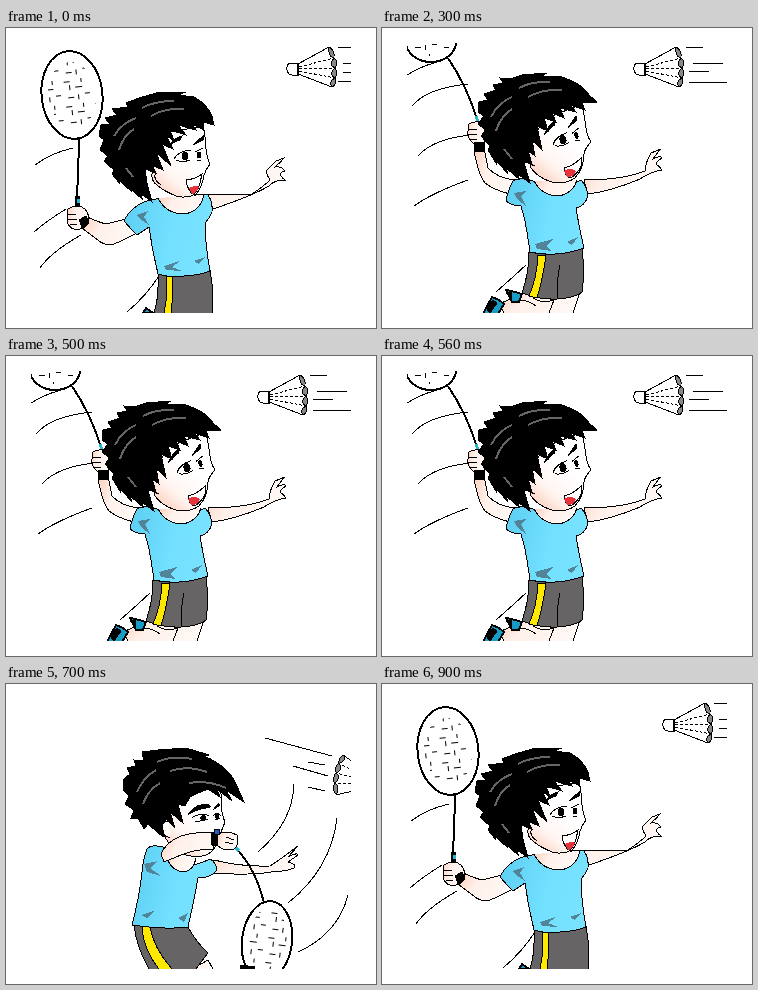
Animation, 370 px wide and 300 px high, one loop 1 s. Source, as an HTML page:

```html
<!DOCTYPE html>
<html lang="en">
<head>
<meta charset="utf-8">
<title>Badminton smash</title>
<style>
html, body { margin: 0; width: 100%; height: 100%; overflow: hidden; background: #fff }
svg { display: block; width: 370px; height: 300px }
path, ellipse { fill: none; stroke: #000; stroke-width: 1 }
.pose { display: none }
.pose.on { display: inline }
.skin { fill: url(#skin) }
.face { fill: url(#face) }
.shirt { fill: url(#shirt) }
.fold { fill: #528499; stroke: none }
.shorts { fill: #666465 }
.stripe { fill: #ffe800 }
.hair, .ink { fill: #000 }
.shine { stroke: #666; stroke-width: 2 }
.white { fill: #fff }
.feather { fill: #888 }
.red { fill: #e8323c; stroke: none }
.blue { fill: #2357c5 }
.shoe { fill: #189bc4; stroke-width: 2 }
.frame { fill: #fff; stroke-width: 2 }
.net { fill: url(#net); stroke: none }
.shaft { stroke-width: 2 }
.grip { stroke-width: 5 }
.tape { stroke: #24b9cc; stroke-width: 3 }
</style>
</head>
<body>
<svg viewBox="0 0 370 300" shape-rendering="crispEdges">
<defs>
  <clipPath id="view"><path d="M25 15H345V285H25Z"/></clipPath>
  <linearGradient id="skin" x2="1" y2=".3">
    <stop stop-color="#fbcdb8"/><stop offset=".4" stop-color="#fff0ea"/><stop offset="1" stop-color="#fff8f5"/>
  </linearGradient>
  <linearGradient id="face" x1=".1" y1="1" x2=".5" y2=".4">
    <stop stop-color="#fbc9b5"/><stop offset=".5" stop-color="#fff5f1"/><stop offset="1" stop-color="#fff"/>
  </linearGradient>
  <linearGradient id="shirt" x2="1" y2=".2">
    <stop stop-color="#5ccdf2"/><stop offset=".6" stop-color="#72e0ff"/><stop offset="1" stop-color="#78e2ff"/>
  </linearGradient>
  <pattern id="net" width="29" height="25" patternUnits="userSpaceOnUse">
    <path d="M1 3.500h6M6.500 7v5M12 9.500h7M18.500 1v4M21 16.500h5M4 19.500h6M14.500 17v5"/>
  </pattern>

  <g id="shuttle">
    <path class="white" d="M5 -5L36 -22Q42 -19 41 -11Q46 -7 42 -1Q46 4 42 9Q44 16 39 18L5 5Z"/>
    <path stroke-dasharray="3 2" d="M6 -2L41 -11M6 0L42 -1M6 2L42 9"/>
    <path class="feather" d="M36 -22Q42 -19 41 -11Q35 -12 36 -22M41 -11Q46 -7 42 -1Q35 -4 41 -11M42 -1Q46 4 42 9Q35 5 42 -1M42 9Q44 16 39 18Q35 13 42 9"/>
    <path class="white" d="M5 -6H-3Q-7 -4 -6 1Q-5 6 -1 6H5Z"/>
    <path stroke-width="2" d="M4 -6V6"/>
  </g>

  <g id="eyes">
    <path class="ink" d="M-16 -9Q-10 -18 -2 -20L-4 -16Q-9 -15 -16 -9ZM9 -11L19 -20L19 -16Z"/>
    <path stroke-width="2" d="M-10 3Q-6 -5 7 -6M11 -4L19 -8"/>
    <path d="M-8 4Q-2 7 6 4M13 4H17"/>
    <ellipse class="ink" cx="1" rx="3" ry="4"/><ellipse class="ink" cx="15" cy="-1" rx="1.500" ry="3"/>
    <path stroke="#fff" stroke-width="2" d="M0 -1h2"/>
  </g>
  <g id="squint">
    <path class="ink" d="M-12 -5Q-2 -15 10 -11L11 -8Q-1 -9 -12 -5ZM13 -5L20 -11L20 -8Z"/>
    <path stroke-width="2" d="M-9 -1Q0 -5 8 0M12 1Q17 -3 20 2"/>
    <path d="M-7 3Q0 5 7 3M13 5h5"/>
    <ellipse class="ink" cx="2" cy="1" rx="3" ry="2"/><ellipse class="ink" cx="16" cy="2" rx="2" ry="2"/>
  </g>
</defs>

<g clip-path="url(#view)">
<g class="pose" id="ready">
  <path d="M29 137Q45 125 67 120M28 204Q42 192 60 181M34 240Q45 224 75 207M121 284Q140 268 153 248"/>
  <use href="#shuttle" x="287" y="41"/>
  <path d="M332 19.5h13M337 35.5h8M337 44.5h8M332 53.5h13"/>
  <g transform="rotate(-6 66 67)">
    <ellipse class="frame" cx="66" cy="67" rx="30.500" ry="44"/>
    <ellipse class="net" cx="66" cy="67" rx="24" ry="33"/>
  </g>
  <path class="shaft" d="M73 111L72 150L70 180"/>
  <path class="grip" d="M71 168V178M68 196V201"/>
  <path class="tape" d="M72 171v4"/>
  <path class="skin" d="M79 188Q92 194 100 196L124 190L133 204Q116 213 108 216Q100 219 92 212L76 200Z"/>
  <path class="skin" d="M62 181Q60 190 62 196Q66 203 74 201L82 196Q84 186 79 181Q72 175 62 181ZM62 186h8M62 191h9M64 196h7"/>
  <path class="ink" d="M73 192L80 188L83 194L77 201Z"/>
  <path class="skin" d="M188 166H246Q258 158 264 152Q258 143 262 141L270 133L278 130Q275 134 269 139Q276 138 279 143Q270 145 279 152Q268 152 263 158Q246 168 207 181Z"/>
  <path class="shoe" d="M137 285L140 280L147 285Z"/>
  <path class="shorts" d="M152 246L204 242Q208 262 206 285H148Q153 270 152 246Z"/>
  <path class="stripe" d="M160 248H167Q167 270 165 285H158Q162 268 160 248Z"/>
  <path class="shirt" d="M150 171Q138 172 128 180Q121 186 118 193Q124 200 131 207Q137 203 143 199Q146 222 152 246Q165 250 178 248Q195 247 204 243Q199 215 199 195Q204 190 206 184Q207 174 202 167Q195 165 188 168Q170 174 155 170Z"/>
  <path class="fold" d="M130 187L142 183L138 189L143 197L134 191ZM158 238L174 233L166 239L176 243L160 242ZM188 233L199 229L193 236Z"/>
  <path class="skin" d="M152 170Q160 186 178 186Q194 184 198 167"/>
  <path class="face" d="M150 130L160 105L197 98Q200 112 200 121Q201 130 204 136Q200 141 198 147Q196 160 190 166Q180 171 170 168Q158 163 152 158Q143 152 147 142Z"/>
  <path class="white" d="M180 152Q190 151 196 146L194 155Q191 166 186 166Q181 160 180 152Z"/>
  <path class="red" d="M183 160Q189 157 193 159Q190 166 186 166Z"/>
  <path class="hair" d="M95 97L104 96L99 90L111 87L106 81L122 79L120 75L133 70L150 65L180 64L172 67L188 69Q200 75 206 88L208 97L197 94L198 102L186 96L190 102L172 97L180 107L164 102L168 113L160 107L167 121L156 116L165 138L150 124L157 142L146 137L150 145L139 141L141 155L146 174L134 165L137 172L124 160L126 164L113 152L114 156L106 146L108 142L98 133L102 128L94 122L98 112L93 108Z"/>
  <path class="shine" d="M108 108Q116 95 130 90M113 122Q117 108 128 101M136 80Q148 73 168 73M145 88Q158 80 178 81M120 140L127 149"/>
  <use href="#eyes" x="178" y="128"/>
  <path d="M150 145Q146 151 155 157"/>
</g>

<g class="pose" id="jump">
  <path d="M25 47Q40 38 52 35M30 78Q45 60 86 56M36 128Q52 110 90 107M32 178Q50 165 86 152M114 264Q130 250 144 237"/>
  <use href="#shuttle" x="258" y="41"/>
  <path d="M304 19.500h17M311 35.500h30M307 43.500h20M307 54.500h38"/>
  <ellipse class="frame" cx="49" cy="14" rx="25" ry="20"/>
  <ellipse class="net" cx="49" cy="14" rx="20" ry="14"/>
  <path class="shaft" d="M66 30Q85 58 96 94"/>
  <path class="tape" d="M94 88l2 6"/>
  <path class="skin" d="M92 122L102 120L106 140Q115 150 133 152L128 166Q112 162 103 155Q96 146 92 122Z"/>
  <path class="skin" d="M87 96Q94 92 101 95Q104 104 102 115L92 116Q85 111 86 103ZM87 101h8M86 106h9M88 111h7"/>
  <path class="ink" d="M92 115L102 114L102 123L93 123Z"/>
  <path class="skin" d="M202 152Q240 152 263 143Q264 133 269 125L279 121Q274 126 271 131Q278 127 280 130Q274 134 274 136Q277 138 280 142Q270 143 258 151Q230 163 206 166Z"/>
  <path class="skin" d="M117 276L140 266L198 264L191 285H122Z"/>
  <path d="M151 270Q160 276 172 272L167 285M132 272Q145 271 154 278"/>
  <path class="shoe" d="M102 284L110 269L117 272L122 276L116 286H101ZM124 262Q130 263 140 266L137 274H130Z"/>
  <path class="ink" d="M104 280L111 272L115 275L108 285ZM124 264L130 264L129 272Z"/>
  <path class="shorts" d="M147 224Q175 230 200 220Q203 245 200 264Q193 270 175 271Q158 272 140 265Q147 245 147 224Z"/>
  <path d="M178 237Q174 255 176 270"/>
  <path class="stripe" d="M156 227H164Q161 250 155 270L147 268Q155 250 156 227Z"/>
  <path class="shirt" d="M148 152Q136 149 131 153Q126 162 124 173Q130 178 139 178Q143 190 145 204L148 224Q175 230 202 220Q197 200 194 180Q203 178 206 168Q205 158 199 152Q185 160 165 157Z"/>
  <path class="fold" d="M132 165L144 163L139 168L144 178L135 171ZM153 216L171 211L164 218L170 223L155 221ZM185 214L196 209L190 217Z"/>
  <path class="skin" d="M152 153Q160 168 178 168Q192 164 195 152"/>
  <path class="face" d="M146 128L160 92L200 76Q203 92 204 100Q205 108 209 114Q203 120 202 126Q202 140 193 150Q183 157 170 154Q156 150 149 140Z"/>
  <path class="white" d="M182 140Q191 138 199 130L199 138Q195 147 188 150Q183 148 182 140Z"/>
  <path class="red" d="M182 143Q188 139 194 143Q191 150 185 149Z"/>
  <path class="hair" d="M97 74L106 72L102 66L114 62L111 57L121 55L118 50L128 51L140 47L165 45L160 48L180 49Q200 55 208 68L215 74L200 75L203 82L188 77L194 84L178 80L182 90L170 85L174 94L162 90L166 103L155 98L160 122L150 112L153 128L146 122L150 136L142 134L148 155L136 146L137 151L124 140L126 146L114 132L115 137L106 122L108 118L99 108L104 102L96 96L102 88L96 84Z"/>
  <path class="shine" d="M109 89Q116 75 130 69M114 103Q118 89 130 81M137 60Q150 53 168 54M146 69Q160 61 180 62M122 121L130 131"/>
  <use href="#eyes" transform="translate(180 112) rotate(-13)"/>
  <path d="M147 126Q143 135 153 138"/>
</g>

<g class="pose" id="hit">
  <path d="M69 23C110 8 185 20 224 46M243 15L252 21"/>
  <path class="skin" d="M209 169Q230 186 259 195Q270 191 287 191L275 196Q286 199 288 203L278 203Q282 207 277 210Q268 208 262 204Q235 201 203 182Z"/>
  <path class="skin" d="M180 274H191L184 285H174ZM144 280L158 280L156 285H143Z"/>
  <path class="skin" d="M114 276L138 269L138 279L118 285Z"/>
  <path class="shoe" d="M97 284L104 268L112 265L114 273L109 286H98ZM119 267L125 262L141 269L139 275H128Z"/>
  <path class="ink" d="M99 281L105 271L109 274L104 285ZM120 267L127 264L128 272Z"/>
  <path class="shorts" d="M138 233Q165 240 193 236Q196 255 194 272Q185 276 177 276Q160 281 137 280Q142 255 138 233Z"/>
  <path d="M172 244Q169 260 171 276"/>
  <path class="stripe" d="M148 235H156Q156 256 154 280H146Q149 258 148 235Z"/>
  <path class="shirt" d="M152 163Q140 157 132 160Q132 174 136 187Q140 190 144 187Q143 210 137 234Q165 239 195 235Q196 210 197 186Q201 186 203 182L210 169Q207 163 201 162Q188 170 165 166Z"/>
  <path class="fold" d="M142 180L153 175L146 182L152 191L143 187ZM147 209L158 205L152 211L150 219ZM180 227L192 221L184 230Z"/>
  <path class="skin" d="M155 165Q165 180 180 179Q187 176 188 165"/>
  <path class="face" d="M152 140L165 105L202 98Q204 112 204 122Q205 130 209 135Q204 140 203 146Q202 158 194 164Q185 168 172 165Q160 160 154 152Z"/>
  <path class="red" d="M186 152L198 152L194 159L187 157Z"/>
  <path d="M183 149Q193 152 201 147L196 157Q190 160 186 157Z"/>
  <path class="hair" d="M103 104L106 90L104 85L110 78L108 72L114 66L124 63L130 58L145 56L160 55L178 57L174 59L194 64Q208 72 215 85L222 99L204 94L207 102L196 97L190 104L180 104L176 112L168 114L171 126L164 121L170 137L158 128L164 143L166 152L156 140L150 153L140 143L134 158L128 148L119 143L122 138L108 128L112 122L104 115L107 111Z"/>
  <path class="shine" d="M117 107Q124 91 138 84M124 120Q128 106 139 97M145 70Q160 63 179 66M155 80Q172 73 191 77"/>
  <use href="#eyes" x="183" y="123"/>
  <path class="skin" d="M158 108Q143 118 137 140L133 161Q145 158 152 163Q154 136 174 112Z"/>
  <path d="M157 136Q153 146 160 151"/>
  <g transform="rotate(38 253 45)">
    <ellipse class="frame" cx="253" cy="45" rx="14" ry="35"/>
    <ellipse class="net" cx="253" cy="45" rx="9" ry="28"/>
  </g>
  <path class="shaft" d="M231 74L180 100"/>
  <path class="skin" d="M160 97Q168 93 177 97L179 104Q174 111 160 112Q155 105 160 97ZM164 98v6M169 97v6M174 98v5"/>
  <path class="blue" d="M176 98L181 97L182 102L178 103Z"/>
  <use href="#shuttle" transform="translate(270 50) rotate(14)"/>
</g>

<g class="pose" id="follow">
  <path d="M259 54L326 72M302 78L319 81M287 82L322 92M302 103L319 107M288 100Q287 138 252 168M331 134Q325 185 282 219M342 211Q332 250 292 268"/>
  <use href="#shuttle" transform="translate(371 99) rotate(195)"/>
  <path class="skin" d="M208 176Q235 183 264 182Q275 175 292 162L282 173Q292 168 292 171L282 178Q291 180 288 184Q278 188 270 187Q250 192 207 189Z"/>
  <path class="skin" d="M186 285L202 276L207 285Z"/>
  <path class="shorts" d="M128 241Q160 246 182 243Q190 258 202 269L190 285H143Q130 262 128 241Z"/>
  <path class="stripe" d="M136 242L144 243Q148 265 166 285H153Q137 265 136 242Z"/>
  <path class="shirt" d="M157 163Q145 160 141 165Q136 180 136 188Q134 210 126 241Q160 246 182 243Q188 218 192 194Q205 194 211 186Q210 178 204 175Q185 185 165 180Z"/>
  <path class="fold" d="M138 180L152 177L144 184L155 192L141 188ZM135 231L150 226L141 234ZM172 234L182 229L178 238Z"/>
  <path class="skin" d="M160 172Q165 187 178 188Q188 186 190 174"/>
  <path class="face" d="M158 135L170 112L214 100Q216 118 216 128Q217 134 219 138Q214 150 212 158Q206 171 196 172Q182 174 172 167Q161 160 158 150Z"/>
  <path class="hair" d="M118 95L124 90L121 84L130 82L128 76L138 77L136 68L152 66L180 64L203 71L198 72Q222 82 230 100L238 118L220 106L226 117L211 105L214 113L202 105L190 110L184 113L179 122L172 120L177 139L164 128L169 144L160 135L157 153L149 146L142 140L138 145L132 134L125 134L128 126L119 120L123 112L117 106Z"/>
  <path class="shine" d="M131 108Q137 94 150 86M137 120Q142 106 154 99M151 78Q167 71 186 75M164 87Q181 81 201 88M183 99Q203 96 220 104"/>
  <use href="#squint" transform="translate(195 133) rotate(-10)"/>
  <path class="face" d="M163 137Q154 138 157 146Q158 154 164 153"/>
  <path class="skin" d="M155 170Q160 158 175 152Q192 147 208 149L207 165Q190 165 175 171L158 178Z"/>
  <path class="shaft" d="M229 163Q250 185 258 219"/>
  <path class="tape" d="M228 162l5 5"/>
  <path class="skin" d="M212 150Q222 146 231 151Q234 160 228 165Q218 168 211 161ZM220 153l8 3M219 158l8 2"/>
  <path class="ink" d="M205 149L211 150L211 161L206 161Z"/>
  <path class="blue" d="M208 145h5v5h-5Z"/>
  <g transform="rotate(7 261 257)">
    <ellipse class="frame" cx="261" cy="257" rx="25" ry="40"/>
    <ellipse class="net" cx="261" cy="257" rx="20" ry="33"/>
  </g>
  <path class="ink" d="M234 281L249 283L248 286H234Z"/>
</g>

<g class="pose" id="finish">
  <path class="white" d="M73 177Q78 169 97 174Q128 185 138 210Q145 225 144 242Q125 246 103 234Q76 214 73 177Z"/>
  <path d="M75 180Q80 172 97 177Q125 188 135 211Q142 226 141 239Q124 242 104 231Q79 211 75 180Z"/>
  <ellipse class="net" transform="rotate(46 107 206)" cx="107" cy="206" rx="34" ry="17"/>
  <path class="shaft" d="M143 240L222 232"/>
  <path class="skin" d="M214 197Q232 209 248 215L264 217Q280 211 294 213L284 219Q296 217 293 222L282 224Q285 230 276 233Q262 228 245 227Q225 219 208 208Z"/>
  <path class="shorts" d="M140 250Q165 255 190 252Q195 270 206 285H150Q140 268 140 250Z"/>
  <path class="stripe" d="M149 251H156Q156 270 165 285H156Q148 268 149 251Z"/>
  <path class="shirt" d="M165 172Q152 171 149 177Q146 190 148 204Q144 228 135 249Q160 255 190 251Q192 235 195 220L204 210Q214 204 216 197Q212 189 205 186Q185 195 172 180Z"/>
  <path class="fold" d="M143 238L160 235L168 242L153 241L146 246ZM180 242L189 236L187 246ZM158 190L167 194L163 202Z"/>
  <path class="skin" d="M167 172Q180 190 192 191Q198 190 200 184"/>
  <path class="face" d="M172 142L195 118L235 125Q235 142 229 150Q227 158 225 162Q224 172 216 180Q208 190 196 188Q182 185 173 172Z"/>
  <path class="red" d="M199 179L209 180Q205 186 199 183Z"/>
  <path d="M195 177Q203 181 210 180Q205 187 198 183Z"/>
  <path class="hair" d="M146 97L156 94L151 89L166 90L162 84L172 84L168 76L182 78L196 69L192 73Q215 73 236 82L232 83Q252 95 257 120L258 141L249 126L252 146L243 136L240 161L235 142L229 128L220 120L207 123L200 120L194 135L187 128L185 140L178 136L171 146L172 165L163 152L157 168L155 152L149 153L151 140L146 133L150 125L146 118L152 108Z"/>
  <path class="shine" d="M161 119Q167 103 180 96M168 130Q174 114 186 107M181 89Q198 81 216 87M193 99Q212 90 230 101M222 110Q239 112 244 125"/>
  <use href="#squint" transform="translate(208 153) rotate(8)"/>
  <path class="face" d="M180 136Q171 140 174 150Q176 156 181 152"/>
  <path class="skin" d="M177 196Q188 209 222 223L218 236Q195 231 159 209Z"/>
  <path class="shirt" d="M165 172Q152 171 149 177Q146 190 148 204Q164 212 180 197Q178 182 166 174Z" style="stroke:none"/>
  <path d="M165 172Q152 171 149 177Q146 190 148 204Q164 212 180 197"/>
  <path class="skin" d="M223 223Q234 219 241 224Q242 230 238 232Q230 237 223 235Z"/>
  <path class="ink" d="M218 223L224 222L224 236L217 235Z"/>
  <path class="blue" d="M232 223L238 224L239 229L234 229Z"/>
</g>
</g>
</svg>
<script>
// Start time of each pose in ms; poses switch with hard cuts
const cues = [[0, "ready"], [300, "jump"], [600, "hit"], [700, "follow"], [800, "finish"], [900, "ready"]];
const poses = document.querySelectorAll(".pose");

function draw() {
  const t = performance.now() % 1000;
  const current = cues.findLast(([start]) => t >= start)[1];
  for (const pose of poses) pose.classList.toggle("on", pose.id === current);
  requestAnimationFrame(draw);
}
draw();
</script>
</body>
</html>
```
